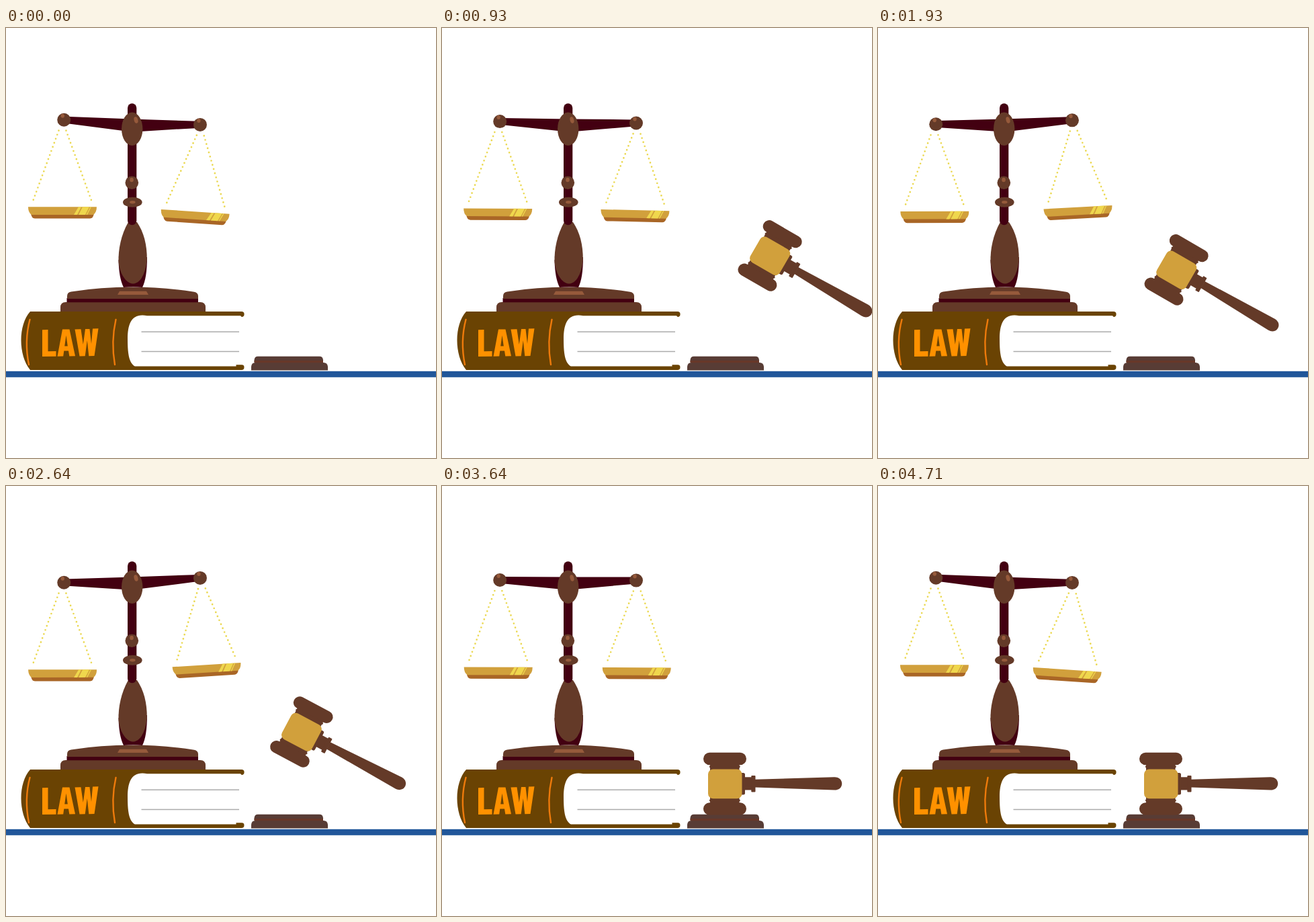
Recreate the animation shown at these times as an HTML page. Size 640x640 px, loop 4.78 s.

```html
<!DOCTYPE html>
<html lang="en">
<head>
<meta charset="utf-8">
<title>Scales, law book and gavel</title>
<style>
  html, body { margin: 0; height: 100%; overflow: hidden; background: #fff; }
  svg { display: block; width: 100%; height: 100%; }
  .brown { fill: #643a28; }
  .dark { fill: #430011; }
  .shine { fill: #965a3b; }
  .gold { fill: #d1a03c; }
  .cover { fill: #6a4303; }
  .block { fill: #583c35; }
  .string { stroke: #ebd953; stroke-width: 2.7; stroke-linecap: round; stroke-dasharray: 0 6.45; }
  .stripe { fill: none; stroke: #ee7a0b; stroke-width: 2.4; stroke-linecap: round; }
  .line { stroke: #ababab; stroke-width: 1.5; }
</style>
</head>
<body>
<svg viewBox="0 0 640 640">
  <defs>
    <g id="pan">
      <path class="string" d="M-5.5 16L-45.4 125M5.5 16L45 125"/>
      <path fill="#a96626" d="M-47 139H47Q46 146.8 41 146.8H-41Q-46 146.8-47 139Z"/>
      <path class="gold" d="M-51 129.6H51Q51 138 46 141.2H-46Q-51 138-51 129.6Z"/>
      <path fill="#efd74d" d="M24 129.6H28L22 141.2H17ZM30 129.6H40L34 141.2H24ZM41.5 129.6H43L37 141.2H35.5Z"/>
    </g>
    <g id="ball">
      <circle class="brown" r="10"/>
      <ellipse class="shine" cx="-2" cy="-6" rx="2.7" ry="3"/>
    </g>
    <rect id="bumper" class="brown" x="389" width="64" height="18.4" rx="9.2"/>
  </defs>

  <!-- book -->
  <path class="cover" d="M36 422H350.5a4 4 0 0 1 0 8.2H340V501H350.5a4 4 0 0 1 0 8H36C18 487 18 442 36 422Z"/>
  <path fill="#fff" d="M349 428.3H210C187 424 181 440 181 463C181 488 184 499 192 503.6H342.5V501.2H356V430.2H351Z"/>
  <path class="line" d="M201.5 452.2H347M201.5 481.6H347"/>
  <path class="stripe" d="M35.5 434Q27 466 34 501M163.5 434Q156 467 162 501"/>
  <path role="img" aria-label="LAW" fill="#ff9100" fill-rule="evenodd" d="M54 449.2L62.5 449V481.2L74.5 481V488.8L54 489Z
    M84 448.6L94.5 448.4L103 488.2L94.3 488.4L93 480.6H86.3L85.2 488.6L76.5 488.8ZM89.5 457.5L87.2 473.6H91.8Z
    M102.5 448.4L111.5 448.2L114.8 471L118 448L124.5 447.9L127 470L129 447.5L137.5 447.2L131.5 488L123.3 488.2L120.8 465L117.7 488.3L109.5 488.5Z"/>

  <!-- table and sounding block -->
  <rect y="510.8" width="640" height="9" fill="#20569a"/>
  <path class="block" d="M369.5 497V494Q370 488.7 375 488.7H466.500Q471.500 488.700 472 494V497Z"/>
  <path class="block" d="M365 509.600V504Q365.500 498 371 498H472.500Q478.500 498 479 504V509.600Z"/>
  <rect x="369.5" y="495" width="102.500" height="3.200" fill="#683829"/>

  <!-- stand -->
  <path class="brown" d="M81 422V416Q81 408 89 408H289Q297 408 297 416V422Z"/>
  <rect class="dark" x="90.500" y="402" width="195.500" height="6.300"/>
  <path class="brown" d="M91 403V399Q91 393.300 97 392.400Q188 378.500 280 392.800Q286 394 286 399V403Z"/>
  <path class="shine" d="M169 391.800H209L212 397H166Z"/>
  <path class="dark" d="M167.500 345Q168 372 175 386Q189 384.600 203 386Q210 372 210 341Z"/>
  <path class="brown" d="M182 289C171 308 167 330 167.500 348C170 370 181 380.500 189 380.500C198 380.500 207 370 209.800 345C210 322 205 304 195 289Z"/>
  <rect class="dark" x="181" y="112.300" width="13.300" height="181" rx="6.600"/>

  <!-- balance -->
  <use id="leftPan" href="#pan"/>
  <use id="rightPan" href="#pan"/>
  <g id="beam">
    <path class="dark" d="M88 135.200L187 135.500L286 135.200V145.400L200 153.500H175L88 145.200Z"/>
  </g>
  <use id="leftBall" href="#ball"/>
  <use id="rightBall" href="#ball"/>
  <ellipse class="brown" cx="187.700" cy="150.300" rx="15.700" ry="24.700"/>
  <ellipse class="shine" cx="193.500" cy="137" rx="2.900" ry="4.800" transform="rotate(-15 193.500 137)"/>
  <circle class="brown" cx="187.300" cy="230.200" r="9.800"/>
  <ellipse class="shine" cx="187" cy="226" rx="2.800" ry="3.200"/>
  <ellipse class="brown" cx="188.300" cy="259.300" rx="14.300" ry="7.500"/>
  <ellipse class="shine" cx="188.300" cy="259.300" rx="4.200" ry="2.200"/>

  <g id="gavel">
    <path class="brown" d="M399 412H442.500V416L444 417.500L442.500 420V423H399V420L397.800 417.500L399 416ZM399 463H442.500V466L444 468L442.500 470V474H399V470L397.800 468L399 466Z"/>
    <use href="#bumper" y="396.800"/>
    <use href="#bumper" y="471.200"/>
    <rect class="brown" x="444" y="427" width="7" height="32.500" rx="2.500"/>
    <rect class="brown" x="449" y="433.300" width="12" height="19.200"/>
    <rect class="brown" x="460.300" y="431" width="6.200" height="24.500" rx="1"/>
    <path class="brown" d="M466 436.800L584 433.200C599 433.200 599 452.600 584 452.600L466 448.400Z"/>
    <rect class="gold" x="396" y="421.500" width="50.500" height="43.700" rx="7.500"/>
  </g>
  <path id="spark" fill="#fff" d="M0-1L.23-.23L1 0L.23.23L0 1L-.23.23L-1 0L-.23-.23Z"/>
</svg>
<script>
const LOOP = 4780, SETTLE = 2000, IMPACT = 2860;
const HUB = { x: 187.6, y: 140.3 }, ARM = 101.4;
const clamp = v => Math.min(1, Math.max(0, v));
const place = (id, transform) => document.getElementById(id).setAttribute("transform", transform);

function drawSide(name, side, tilt, swing, offset) {
  const a = tilt * Math.PI / 180;
  const at = `translate(${HUB.x + side * ARM * Math.cos(a)} ${HUB.y + side * ARM * Math.sin(a)})`;
  place(name + "Ball", at);
  place(name + "Pan", `${at} rotate(${swing}) translate(${offset} 0)`);
}

function drawBalance(t) {
  const c = Math.cos(2 * Math.PI * t / LOOP), tilt = 2.03 * c;
  place("beam", `rotate(${tilt} ${HUB.x} ${HUB.y})`);
  drawSide("left", -1, tilt, 0.35 * Math.sin(Math.PI * c), -2.3);
  drawSide("right", 1, tilt, 3.8 * c, 1.4);
}

function drawGavel(t) {
  // glides in with decaying speed, then swings down around the handle's end
  const u = clamp(t / SETTLE);
  const slide = 250 * (Math.exp(-3.6 * u) - Math.exp(-3.6) * u * u);
  const angle = 30 * (1 - clamp((t - SETTLE) / (IMPACT - SETTLE)) ** 9);
  place("gavel", `translate(${slide} ${-0.478 * slide}) rotate(${angle} 586 442.5)`);
  const size = 21 * Math.sin(Math.PI * clamp((t - 2830) / 690));
  place("spark", `translate(413 488.3) scale(${size})`);
}

function frame() {
  const t = performance.now() % LOOP;
  drawBalance(t);
  drawGavel(t);
  requestAnimationFrame(frame);
}
frame();
</script>
</body>
</html>
```
